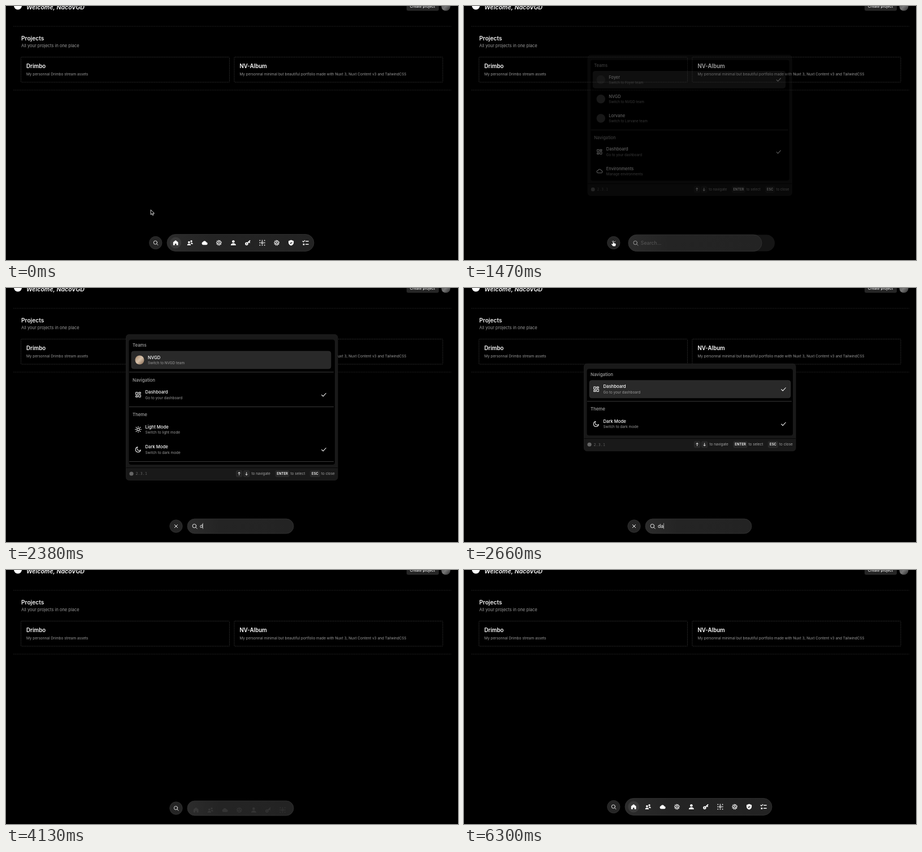
An HTML page for the animation above (6370 ms loop, 800 by 450 pixels).

```html
<!DOCTYPE html>
<html lang="en">
<head>
<meta charset="utf-8">
<title>Command palette</title>
<style>
  html, body { margin: 0; width: 100%; height: 100%; overflow: hidden; background: #000; }
  svg { display: block; width: 100vw; height: 100vh; font-family: Inter, sans-serif; }
</style>
</head>
<body>
<svg viewBox="0 0 800 450">
  <defs>
    <linearGradient id="photo" x2="1" y2="1">
      <stop stop-color="#444"/><stop offset=".5" stop-color="#777"/><stop offset="1" stop-color="#2c2c2c"/>
    </linearGradient>
    <linearGradient id="sand" x2="1" y2="1">
      <stop stop-color="#a5866b"/><stop offset=".5" stop-color="#d8c2aa"/><stop offset="1" stop-color="#7d6049"/>
    </linearGradient>
    <linearGradient id="pill">
      <stop stop-color="#2c2c2c"/><stop offset=".3" stop-color="#242424"/><stop offset="1" stop-color="#232323"/>
    </linearGradient>
  </defs>
  <g id="page"></g>
  <g id="palette"></g>
  <g id="dock"></g>
  <g id="cursor"></g>
</svg>
<script>
const LOOP = 6370, STEP = 70;
const OPEN = 1050, SWAP = 1260, SHOWN = 1680, TYPE = 2310, CLOSE = 4130;

const $ = id => document.getElementById(id);
const span = (t, a, b) => Math.min(1, Math.max(0, (t - a) / (b - a)));
const smooth = p => p * p * (3 - 2 * p);
const easeOut = p => 1 - (1 - p) ** 3;
const mix = (a, b, p) => a + (b - a) * p;

const text = (x, y, size, fill, str, extra = '') =>
  `<text x="${x}" y="${y}" font-size="${size}" fill="${fill}" ${extra}>${str}</text>`;
const rect = (x, y, w, h, r, fill, extra = '') =>
  `<rect x="${x}" y="${y}" width="${w}" height="${h}" rx="${r}" fill="${fill}" ${extra}/>`;
const circle = (x, y, r, fill, extra = '') =>
  `<circle cx="${x}" cy="${y}" r="${r}" fill="${fill}" ${extra}/>`;
const group = (body, extra) => `<g ${extra}>${body}</g>`;
const SEMI = 'font-weight="600"', MEDIUM = 'font-weight="500"';

// Icons on a 24-unit grid; outlines are wrapped by line().
const line = (body, width = 2) =>
  `<g fill="none" stroke="currentColor" stroke-width="${width}" stroke-linecap="round" stroke-linejoin="round">${body}</g>`;
const solid = d => `<path fill="currentColor" d="${d}"/>`;
const dot = (x, y, r) => circle(x, y, r, 'currentColor');
const tile = (x, y, h) => rect(x, y, 7, h, 1, 'none');

const ICONS = {
  home: solid('M12 2 2.5 10v11.5h6.5V15h6v6.5h6.5V10z'),
  users: dot(8, 10, 4) + dot(17, 6, 3.6) + solid('M1 22c0-9 14-9 14 0zM14 14c2-4 9-3 9 3h-6z'),
  cloud: solid('M6.5 20a5.8 5.8 0 0 1-.6-11.3A7 7 0 0 1 19 10a5 5 0 0 1-.5 10z'),
  gear: line('<circle cx="12" cy="12" r="7"/><path d="M12 12V5M12 12l-6 4M12 12l6 4"/>', 2.2) +
    line('<circle cx="12" cy="12" r="9.6" stroke-dasharray=".1 5.93"/>', 3),
  user: dot(12, 7, 5) + solid('M2 22c0-11 20-11 20 0z'),
  key: line('<circle cx="7.5" cy="16" r="4"/><path d="m11 13 9-9M16 8l3 3"/>', 4),
  network: line('<circle cx="12" cy="12" r="3.5"/>', 2.6) +
    [[3, 3], [12, 3], [21, 3], [3, 12], [21, 12], [3, 21], [12, 21], [21, 21]].map(([x, y]) => dot(x, y, 2)).join(''),
  shield: solid('M12 1 2 5v7c0 5 4 9 10 11 6-2 10-6 10-11V5z') +
    '<path d="m8 12 3 3 5-6" fill="none" stroke="#222" stroke-width="2.5"/>',
  tasks: line('<path d="m1 6 3 3 5-6M13 6h10M13 18h10"/>', 2.8) + rect(2, 15, 6, 6, 1, 'currentColor'),
  search: line('<circle cx="11" cy="11" r="7.5"/><path d="m17 17 5 5"/>'),
  close: line('<path d="M5 5l14 14M19 5 5 19"/>', 2.6),
  check: line('<path d="m3 13 6 6L21 6"/>', 2.6),
  dashboard: line(tile(3, 3, 9) + tile(14, 3, 5) + tile(3, 16, 5) + tile(14, 12, 9), 2.2),
  outline: line('<path d="M7 19a5 5 0 0 1-.5-10A6.5 6.5 0 0 1 19 10a4.5 4.5 0 0 1-1 9z"/>', 2.2),
  sun: line('<circle cx="12" cy="12" r="4.5"/><path d="M12 1v2.5M12 20.5V23M1 12h2.5M20.5 12H23M4 4l2 2M18 18l2 2M4 20l2-2M18 6l2-2"/>', 2.2),
  moon: line('<path d="M21 14A9.5 9.5 0 1 1 10 3a7.5 7.5 0 0 0 11 11z"/>', 2.2),
};
const icon = (name, x, y, size, color = '#fff') =>
  group(ICONS[name], `color="${color}" transform="translate(${x - size / 2} ${y - size / 2}) scale(${size / 24})"`);

const DOCK = ['home', 'users', 'cloud', 'gear', 'user', 'key', 'network', 'gear', 'shield', 'tasks'];

function drawPage() {
  const card = (x, title, about) =>
    rect(x, 90.5, 369, 44.5, 1, 'none', 'stroke="#282828" stroke-dasharray="2 1"') +
    text(x + 9.5, 110, 9.7, '#fff', title, SEMI) +
    text(x + 9.5, 123.4, 6.44, '#9a9a9a', about);
  $('page').innerHTML =
    circle(21, -.5, 7, '#fff') +
    text(36, 5.8, 10.6, '#fff', 'Welcome, NacoVGD', SEMI + ' font-style="italic"') +
    rect(709, -10, 57, 18.5, 3, '#262626') +
    text(715, 3, 6.5, '#fff', 'Create project', MEDIUM) +
    circle(778.5, .5, 8, 'url(#photo)') +
    '<path d="M13 36H788M13 149H788" stroke="#1e1e1e" stroke-dasharray="2 1"/>' +
    text(27, 61, 10.2, '#f2f2f2', 'Projects', SEMI) +
    text(27, 73.2, 7.5, '#9a9a9a', 'All your projects in one place') +
    card(26.5, 'Drimbo', 'My personnal Drimbo stream assets') +
    card(404, 'NV-Album', 'My personnal minimal but beautiful portfolio made with Nuxt 3, Nuxt Content v3 and TailwindCSS');
}

const team = (name, fill = '#555') => ({ name, about: `Switch to ${name} team`, fill });
const item = (name, about, glyph, checked) => ({ name, about, glyph, checked });
const naco = team('NVGD', 'url(#sand)');
const dashboard = item('Dashboard', 'Go to your dashboard', 'dashboard', true);
const environments = item('Environments', 'Manage environments', 'outline');
const light = item('Light Mode', 'Switch to light mode', 'sun');
const dark = item('Dark Mode', 'Switch to dark mode', 'moon', true);

const RESULTS = {
  '': [['Teams', { ...team('Foyer'), checked: true }, naco, team('Lorvane')],
       ['Navigation', dashboard, environments], ['Theme', light, dark]],
  d: [['Teams', naco], ['Navigation', dashboard], ['Theme', light, dark], ['Actions', environments]],
  da: [['Navigation', dashboard], ['Theme', dark]],
  das: [['Navigation', dashboard]],
  dash: [['Navigation', dashboard]],
};
const KEYS = [[TYPE, 'd'], [2590, 'da'], [2800, 'das'], [3080, 'dash']];
const queryAt = t => KEYS.reduce((q, [at, value]) => t >= at ? value : q, '');

function row(entry, y, right, selected, loaded) {
  const x = entry.glyph ? 246.5 : 251;
  return (selected ? rect(222, y - 15.5, right - 222, 31, 4, '#292929', 'stroke="#333" stroke-width=".7"') : '') +
    (entry.glyph ? icon(entry.glyph, 234, y, 11.5) : circle(236.5, y, 8, loaded ? entry.fill : '#444')) +
    text(x, y - 1.9, 7.7, '#fff', entry.name, MEDIUM) +
    text(x, y + 7.7, 6.4, '#9a9a9a', entry.about) +
    (entry.checked ? icon('check', right - 12.5, y, 10) : '');
}

function footer(y) {
  const key = (x, w, body) => rect(x, y - 5.5, w, 11, 2, '#262626', 'stroke="#333" stroke-width=".6"') + body;
  const hint = (x, str) => text(x, y + 2.2, 6.4, '#a3a3a3', str);
  const label = (x, str) => text(x, y + 2.2, 6, '#fff', str, SEMI);
  const arrow = (x, d) =>
    `<path d="M${x} ${y - 2.7}v5.4M${x - 2} ${y + .7 * d}l2 ${2 * d} 2 ${-2 * d}" fill="none" stroke="#fff" stroke-width=".9"/>`;
  return circle(222, y, 3.6, '#666') +
    text(229.5, y + 2.4, 6.5, '#666', '2.3.1', 'font-family="Noto Sans Mono, monospace" letter-spacing=".2"') +
    key(407.5, 10.5, arrow(412.7, -1)) + key(420.5, 10.5, arrow(425.7, 1)) + hint(434.5, 'to navigate') +
    key(477, 24, label(479.3, 'ENTER')) + hint(503.5, 'to select') +
    key(538.5, 17, label(541, 'ESC')) + hint(558, 'to close');
}

function drawPalette(t) {
  const alpha = span(t, 1350, SHOWN);
  if (!alpha || t >= CLOSE) { $('palette').innerHTML = ''; return; }
  const groups = RESULTS[queryAt(t)];
  const full = groups.reduce((h, g) => h + 61.5 + 35.5 * (g.length - 2), 31.5);
  const height = Math.min(258, full), top = 211.5 - height / 2, bottom = top + height;
  const right = full > height ? 575 : 578;
  let y = top + 5, list = '';
  groups.forEach(([label, ...entries], g) => {
    if (g) list += rect(218, y - .5, 362, 1, 0, '#3a3a3a');
    list += text(224, y + 16.6, 7.8, '#a3a3a3', label, MEDIUM);
    entries.forEach((entry, i) => list += row(entry, y + 40 + 35.5 * i, right, !g && !i, t >= SHOWN));
    y += 61.5 + 35.5 * (entries.length - 1);
  });
  const inner = [217.5, top + 9, 364.5, height - 36.5, 4];
  $('palette').innerHTML = group(
    `<clipPath id="view">${rect(...inner, '#000')}</clipPath>` +
    rect(212.5, top, 374.5, height, 5, '#191919', 'stroke="#222" stroke-width=".8"') +
    rect(...inner, '#000') + group(list, 'clip-path="url(#view)"') +
    rect(212.5, bottom - 22.5, 374.5, 1, 0, '#050505') + footer(bottom - 11.5),
    `opacity="${alpha}" transform="translate(400 211.5) scale(${mix(.945, 1, alpha)}) translate(-400 -211.5)"`);
}

function drawDock(t) {
  const closing = t >= CLOSE;
  const back = 1 - easeOut(span(t, CLOSE, 4800));
  const stage = (a, b) => closing ? back : smooth(span(t, a, b));
  const p = stage(1350, 1820), shrink = stage(SWAP, SHOWN), slide = stage(1470, 1890);
  const left = mix(285, 321, p), right = mix(545, 509, shrink);
  const top = mix(404.5, 409, p), height = mix(30, 26, p), cy = top + height / 2;
  const bx = mix(264.8, 301, slide), by = mix(419.5, 422, slide);
  const searching = t >= SWAP && !closing;
  const query = queryAt(t);
  const iconAlpha = closing ? smooth(span(t, 4060, 4480)) : 1 - span(t, OPEN, 1330);
  const edge = 'stroke="#343434" stroke-width=".8"';
  const bar = (end, fill, extra) => rect(left, top, end - left, height, height / 2, fill, extra);

  let body = circle(bx, by, 11.2, '#252525', edge) +
    icon(searching ? 'close' : 'search', bx, by, searching ? 9 : 10);
  if (t >= 1400 && t < SHOWN) {
    const trail = mix(550, 509, span(t, 1470, SHOWN));
    body += bar(trail, '#222', `opacity="${.85 * (1 - span(t, 1400, SHOWN))}"`);
  }
  body += `<clipPath id="bar">${bar(right, '#000')}</clipPath>` + bar(right, 'url(#pill)', edge);

  const iconY = cy + 3.2 * p;
  const icons = DOCK.map((name, i) => icon(name, left + 15.2 + 25.55 * i, iconY, 11)).join('');
  if (iconAlpha) body += group(
    circle(left + 15.2, iconY, 10, '#3a3a3a', `opacity="${1 - p}"`) + icons,
    `clip-path="url(#bar)" opacity="${iconAlpha}"`);

  if (searching) {
    const caret = query && !(t >= 3430 && t < 3920) ? '<tspan font-weight="300" dx="-1">|</tspan>' : '';
    body += group(
      icon('search', left + 12.8, cy, 10.5) +
      text(left + 22, cy + 3.1, 8.7, query ? '#fff' : '#777', query ? query + caret : 'Search...'),
      `opacity="${span(t, SWAP, 1610)}"`);
  }
  $('dock').innerHTML = body;
}

function drawCursor(t) {
  if (t >= TYPE) { $('cursor').innerHTML = ''; return; }
  const p = smooth(span(t, 0, 630));
  const x = mix(256.2, 264, p), y = mix(361, 415.5, p);
  const hand = y > 408 && t < 1610;
  const shape = hand
    ? 'M-1 0q1-1.2 2 0v4l3 .8q1.5.4 1.2 2L4.5 10.5h-5L-3.6 6.500q-.5-1.7 1-1.2L-1 6.300z'
    : 'M0 0v8.6l2-1.8 1.4 3 1.5-.7L3.6 6.300h2.7z';
  const [fill, stroke] = hand ? ['#fff', '#000'] : ['#000', '#fff'];
  $('cursor').innerHTML =
    `<path d="${shape}" transform="translate(${x} ${y})" fill="${fill}" stroke="${stroke}" stroke-width=".8"/>`;
}

function frame() {
  const t = Math.floor(performance.now() % LOOP / STEP) * STEP;
  drawPalette(t);
  drawDock(t);
  drawCursor(t);
  requestAnimationFrame(frame);
}

drawPage();
frame();
</script>
</body>
</html>
```
